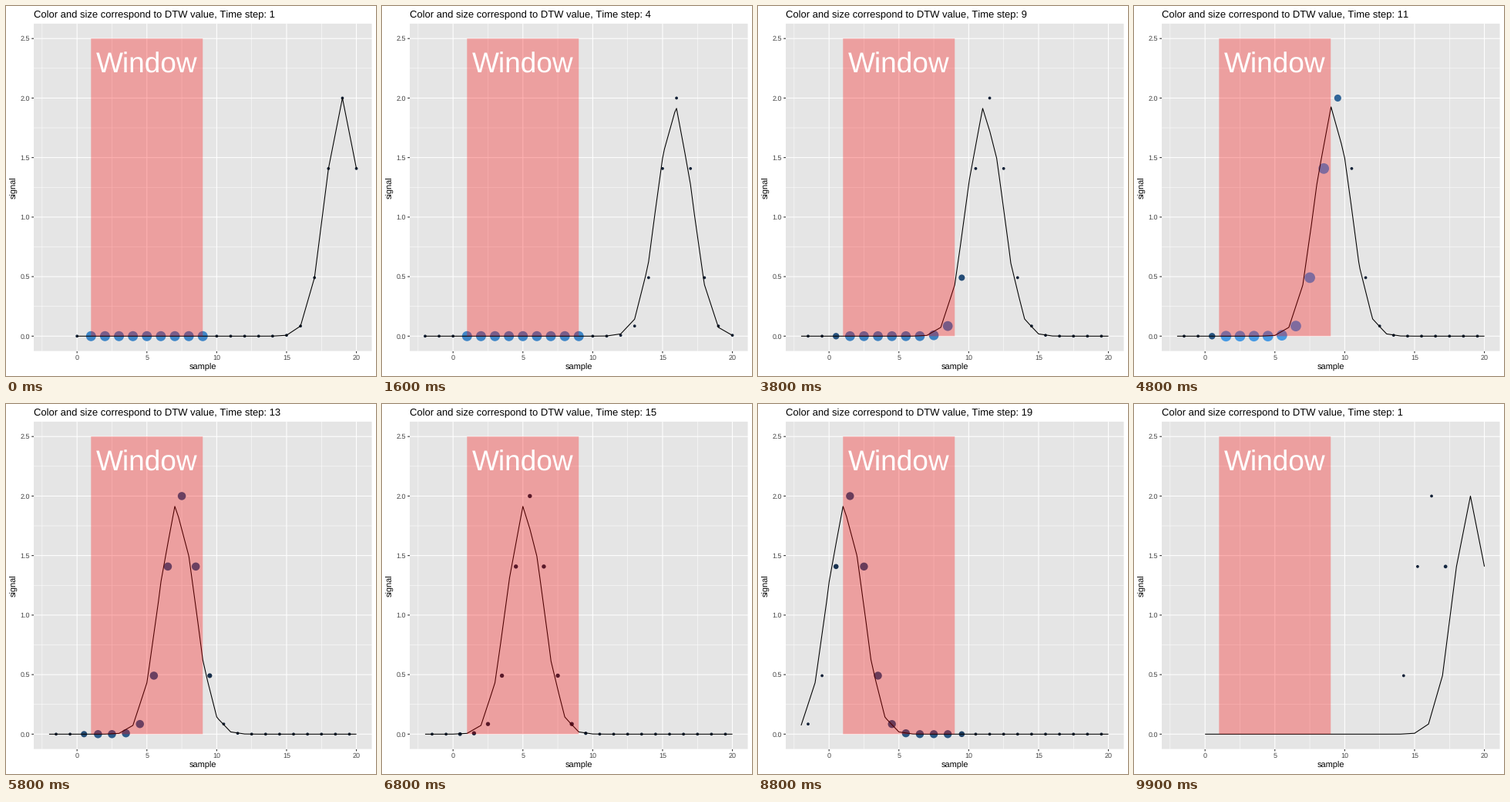
Write a matplotlib script that moves like this. It is 480 px wide and 480 px high and loops after 10 s.

```python
import numpy as np
import matplotlib.pyplot as plt
from matplotlib.animation import FuncAnimation
from matplotlib.patches import Rectangle

plt.rcParams.update({
    "font.family": "Liberation Sans",
    "path.snap": False,
    "path.simplify": False,
    "text.hinting": "none",
    "text.hinting_factor": 1,
})

SIZE, DPI = 480, 72
STATES, STEP = 20, 5
FRAMES = STATES * STEP
LEFT, RIGHT, TOP, BOTTOM = 36, 474.5, 22.9, 447.6
X_LIM, Y_LIM = (-3.1, 21.1), (-0.125, 2.625)
LOW, HIGH = np.array([[16, 32, 54], [80, 170, 250]]) / 255
PATH_POINTS = 50


def bell(d):
    return 2 * np.exp(-0.351 * np.asarray(d, float) ** 2)


def dtw(a, b):
    """Symmetric DTW distance, diagonal steps count twice."""
    cost = np.abs(a[:, None] - b[None, :])
    total = np.full((len(a) + 1, len(b) + 1), np.inf)
    for i, j in np.ndindex(cost.shape):
        c = cost[i, j]
        total[i + 1, j + 1] = c if i == j == 0 else min(
            total[i, j] + 2 * c, total[i, j + 1] + c, total[i + 1, j] + c)
    return total[-1, -1]


def sine_in_out(p):
    return (1 - np.cos(np.pi * p)) / 2


def peak(state):
    return 19 - state


window_x = np.arange(1, 10)
pattern = bell(window_x - peak(15))
scores = np.array([dtw(bell(window_x - peak(s)), pattern) for s in range(STATES)])
scores /= scores.max()


def samples(state):
    """Sample x positions and their ids (offset from the peak)."""
    x = np.arange(max(-2, -state), 21)
    return x, x - peak(state)


def dots(state):
    x, ids = samples(state)
    score = np.where((x >= 1) & (x <= 9), scores[state], 0)
    color = LOW + score[:, None] * (HIGH - LOW)
    table = np.column_stack([x, bell(ids), 1 + 5 * np.sqrt(score), color])
    return ids, table


def tween_dots(a, b, w):
    ids_a, from_a = dots(a)
    if w == 0:
        return from_a
    ids_b, to_b = dots(b)
    _, i, j = np.intersect1d(ids_a, ids_b, return_indices=True)
    return (1 - w) * from_a[i] + w * to_b[j]


def path(state):
    x, ids = samples(state)
    return np.column_stack([x, bell(ids)])


def densify(pts):
    """Insert evenly spaced points along the path, keeping its vertices."""
    arc = np.r_[0, np.cumsum(np.hypot(*np.diff(pts, axis=0).T))]
    extra = PATH_POINTS - len(pts)
    s = np.sort(np.r_[arc, (np.arange(extra) + 0.5) * arc[-1] / extra])
    return np.column_stack([np.interp(s, arc, pts[:, k]) for k in (0, 1)])


def tween_path(a, b, w):
    if w in (0, 1):
        return path(b if w else a)
    return (1 - w) * densify(path(a)) + w * densify(path(b))


def px(x):
    return LEFT + (x - X_LIM[0]) / (X_LIM[1] - X_LIM[0]) * (RIGHT - LEFT)


def py(y):
    return BOTTOM - (y - Y_LIM[0]) / (Y_LIM[1] - Y_LIM[0]) * (BOTTOM - TOP)


fig = plt.figure(figsize=(SIZE / DPI, SIZE / DPI), dpi=DPI, facecolor="white")
page = fig.add_axes([0, 0, 1, 1])
page.set(xlim=(0, SIZE), ylim=(SIZE, 0))
page.axis("off")
ax = fig.add_axes([LEFT / SIZE, 1 - BOTTOM / SIZE,
                   (RIGHT - LEFT) / SIZE, (BOTTOM - TOP) / SIZE])
ax.set(xlim=X_LIM, ylim=Y_LIM, facecolor="#e5e5e5", xticks=[], yticks=[])
for spine in ax.spines.values():
    spine.set_visible(False)


def label(x, y, s, size, color="black", ha="center", **kw):
    return page.text(x, y, s, fontsize=size, color=color, ha=ha,
                     va="baseline", **kw)


def tick(xs, ys):
    page.plot(xs, ys, color="#2b2b2b", lw=1.07, solid_capstyle="butt")


def grid(xs, ys, lw):
    for x in xs:
        ax.axvline(x, color="white", lw=lw, zorder=1)
    for y in ys:
        ax.axhline(y, color="white", lw=lw, zorder=1)


x_ticks, y_ticks = np.arange(0, 21, 5), np.arange(0, 2.6, 0.5)
grid(np.arange(-2.5, 18, 5), np.arange(0.25, 2.5, 0.5), 0.53)
grid(x_ticks, y_ticks, 1.07)
for v in x_ticks:
    tick([px(v)] * 2, [BOTTOM, BOTTOM + 2.74])
    label(px(v), 459, f"{v}", 8.8, "#444444")
for v in y_ticks:
    tick([LEFT - 2.74, LEFT], [py(v)] * 2)
    label(31, py(v) + 3.15, f"{v:.1f}", 8.8, "#444444", "right")

label((LEFT + RIGHT) / 2, 471.7, "sample", 11)
page.text(13.4, (TOP + BOTTOM) / 2, "signal", fontsize=11, rotation=90,
          rotation_mode="anchor", ha="center", va="baseline")
title = label(LEFT, 15.2, "", 13.2, ha="left")

points = ax.scatter([], [], linewidths=0, zorder=2)
line, = ax.plot([], [], color="black", lw=1.07, zorder=3,
                solid_joinstyle="round", solid_capstyle="butt")
ax.add_patch(Rectangle((1, 0), 8, 2.5, fc=(1, 0, 0, 0.3), lw=0, zorder=4))
ax.text(5, 2.3 - 13.3 / 154.44, "Window", fontsize=37, color="white",
        ha="center", va="baseline", zorder=5)


def draw(frame):
    state, k = divmod(frame, STEP)
    after = (state + 1) % STATES
    dot_p = max(0, k - 1) / 4

    # The line runs one frame ahead of the dots.
    line.set_data(*tween_path(state, after, sine_in_out(k / 4)).T)
    table = tween_dots(state, after, sine_in_out(dot_p))
    radius = (table[:, 2] * 2.845 + 0.945) * 0.375 + 0.47
    points.set_offsets(table[:, :2])
    points.set_sizes((2 * radius) ** 2)
    points.set_facecolors(table[:, 3:])

    shown = after if dot_p >= 0.5 else state
    title.set_text("Color and size correspond to DTW value, "
                   f"Time step: {shown + 1}")
    return points, line, title


anim = FuncAnimation(fig, draw, frames=FRAMES, interval=100, repeat=True)
plt.show()
```
